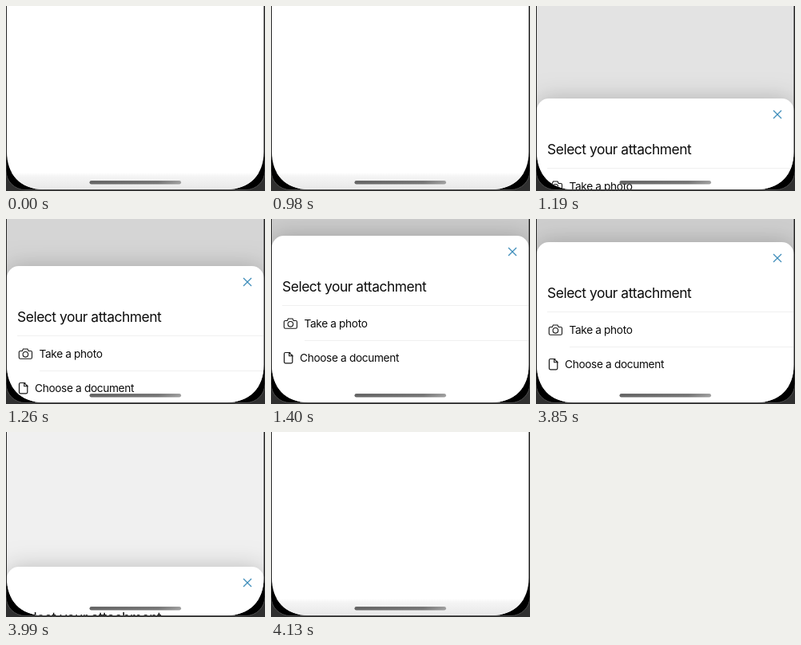
Write an HTML page with a canvas that moves like this. It is 324 px wide and 232 px high and loops after 4.48 s.

```html
<!DOCTYPE html>
<html lang="en">
<head>
<meta charset="utf-8">
<title>Attachment sheet</title>
<style>
  html, body { margin: 0; width: 100%; height: 100%; overflow: hidden; background: #000; }
  canvas { display: block; width: 324px; height: 232px; }
</style>
</head>
<body>
<canvas id="stage" width="324" height="232"></canvas>
<script>
const W = 324, H = 232, LOOP = 4480, STEP = 70;
const OPEN_AT = 1120, CLOSE_AT = 3850;
const SHEET_TOP = 21, TRAVEL = 211;
const OPENING = [0.2, 0.55, 0.82, 0.95, 1];
const CLOSING = [0.962, 0.645, 0.3, 0.09, 0];
const INK = '#161616';
const ctx = document.getElementById('stage').getContext('2d');

// The sheet moves in discrete 70 ms steps.
function progressAt(ms) {
  if (ms < OPEN_AT) return 0;
  const closing = ms >= CLOSE_AT;
  const poses = closing ? CLOSING : OPENING;
  const step = Math.floor((ms - (closing ? CLOSE_AT : OPEN_AT)) / STEP);
  return poses[Math.min(step, poses.length - 1)];
}

function line(points, color, width = 1) {
  ctx.beginPath();
  points.forEach(([x, y]) => ctx.lineTo(x, y));
  ctx.strokeStyle = color;
  ctx.lineWidth = width;
  ctx.stroke();
}

function label(text, x, y, size) {
  ctx.font = `400 ${size}px Inter, "Liberation Sans", sans-serif`;
  ctx.letterSpacing = `${-0.026 * size}px`;
  ctx.fillStyle = '#0c0c0c';
  ctx.fillText(text, x, y);
}

function screenPath() {
  ctx.beginPath();
  ctx.moveTo(1, -1);
  ctx.lineTo(1, 183);
  ctx.bezierCurveTo(1, 211, 18, 230, 47, 230);
  ctx.lineTo(276, 230);
  ctx.bezierCurveTo(305, 230, 322.5, 211, 322.5, 183);
  ctx.lineTo(322.5, -1);
  ctx.closePath();
}

function drawBezel() {
  ctx.fillStyle = '#303030';
  ctx.fillRect(0, 0, W, H);
  ctx.beginPath();
  ctx.roundRect(0, -40, W, 270.5, 24);
  ctx.fillStyle = '#000';
  ctx.fill();
  ctx.strokeStyle = '#4c4c4c';
  ctx.lineWidth = 1;
  ctx.stroke();
}

function drawPage() {
  ctx.fillStyle = '#fff';
  ctx.fillRect(0, 0, W, H);
  const bar = ctx.createLinearGradient(0, 209, 0, 230);
  bar.addColorStop(0, '#fff');
  bar.addColorStop(0.2, '#f5f5f5');
  bar.addColorStop(1, '#e8e8e8');
  ctx.fillStyle = bar;
  ctx.fillRect(0, 209, W, 22);
}

function drawCamera() {
  ctx.beginPath();
  ctx.moveTo(18, 127.5);
  ctx.lineTo(20.3, 127.5);
  ctx.lineTo(21.5, 125);
  ctx.lineTo(27, 125);
  ctx.lineTo(28.2, 127.5);
  ctx.lineTo(31, 127.5);
  ctx.quadraticCurveTo(32.5, 127.5, 32.5, 129);
  ctx.lineTo(32.5, 135.5);
  ctx.quadraticCurveTo(32.5, 137.3, 31, 137.3);
  ctx.lineTo(18, 137.3);
  ctx.quadraticCurveTo(16.3, 137.3, 16.3, 135.5);
  ctx.lineTo(16.3, 129);
  ctx.quadraticCurveTo(16.3, 127.5, 18, 127.5);
  ctx.moveTo(27.7, 131.8);
  ctx.arc(24.4, 131.8, 3.3, 0, Math.PI * 2);
  ctx.strokeStyle = INK;
  ctx.lineWidth = 1.1;
  ctx.stroke();
}

function drawDocument() {
  ctx.beginPath();
  ctx.roundRect(16.5, 167.5, 10.3, 13.3, [1.5, 0, 1.5, 1.5]);
  ctx.strokeStyle = INK;
  ctx.lineWidth = 1.2;
  ctx.stroke();
  ctx.fillStyle = '#fff';
  ctx.beginPath();
  ctx.moveTo(23, 166);
  ctx.lineTo(28, 166);
  ctx.lineTo(28, 171.5);
  ctx.fill();
  line([[22.7, 167.5], [26.8, 171.7], [22.7, 171.7], [22.7, 167.5]], INK, 1.1);
}

function drawSheet(progress) {
  ctx.fillStyle = `rgba(0, 0, 0, ${0.2 * progress})`;
  ctx.fillRect(0, 0, W, H);
  ctx.save();
  ctx.translate(0, Math.round(TRAVEL * (1 - progress)));

  ctx.beginPath();
  ctx.roundRect(1, SHEET_TOP, 321.5, 260, 15);
  ctx.fillStyle = '#fff';
  ctx.shadowColor = 'rgba(0, 0, 0, 0.22)';
  ctx.shadowBlur = 28;
  ctx.fill();
  ctx.shadowColor = 'transparent';

  line([[297, 36], [307, 46]], '#3f8dba', 1.2);
  line([[307, 36], [297, 46]], '#3f8dba', 1.2);
  label('Select your attachment', 14, 91, 17.4);
  line([[14, 108.5], [322, 108.5]], '#f0f0f0');
  drawCamera();
  label('Take a photo', 41.5, 136, 13.7);
  line([[42, 152.5], [322, 152.5]], '#f0f0f0');
  drawDocument();
  label('Choose a document', 36, 179, 13.7);
  ctx.restore();
}

function drawHomeIndicator() {
  const shade = ctx.createLinearGradient(105, 0, 219, 0);
  shade.addColorStop(0, '#666');
  shade.addColorStop(0.75, '#777');
  shade.addColorStop(1, '#a0a0a0');
  ctx.beginPath();
  ctx.roundRect(104.5, 219, 114.5, 4.5, 2.25);
  ctx.fillStyle = shade;
  ctx.fill();
}

function render(now) {
  const progress = progressAt(now % LOOP);
  drawBezel();
  ctx.save();
  screenPath();
  ctx.clip();
  drawPage();
  if (progress > 0) drawSheet(progress);
  drawHomeIndicator();
  ctx.restore();
}

const start = performance.now();
function tick() {
  render(performance.now() - start);
  requestAnimationFrame(tick);
}
tick();
</script>
</body>
</html>
```
